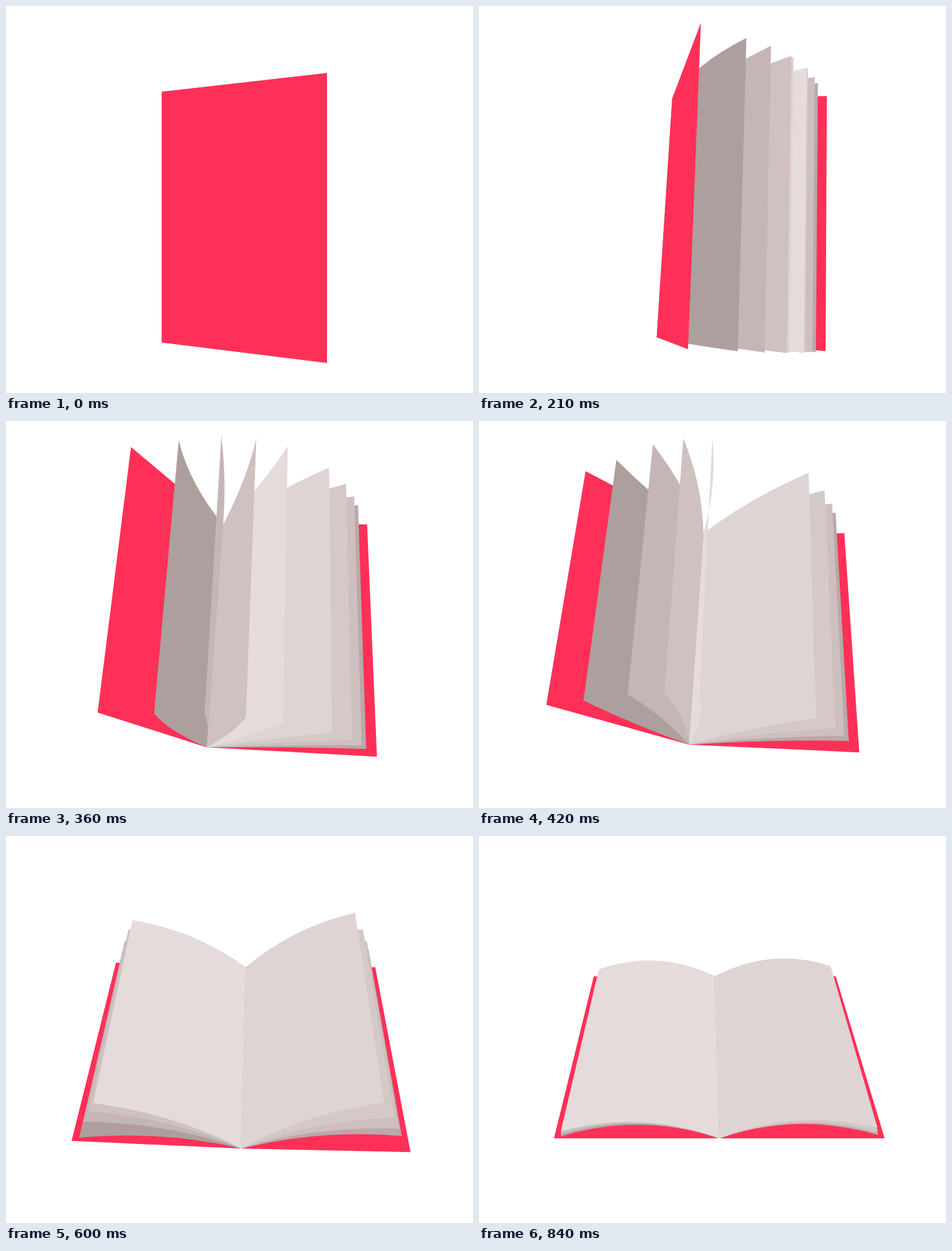
These frames come from a looping animation (822 px wide and 681 px high, 0.93 s). An HTML page:

```html
<!DOCTYPE html>
<html lang="en">
<head>
<meta charset="utf-8">
<title>Opening book</title>
<style>
html, body { margin: 0; width: 100%; height: 100%; overflow: hidden; background: #fff; }
svg { display: block; width: 100vw; height: 100vh; }
</style>
</head>
<body>
<svg id="stage" viewBox="0 0 822 681"></svg>
<script>
const STEP = 30, LOOP = 930, LAST = 28;
const KEYS = [0, 4, 9, 16, 20, LAST];
const RED = '#ff3058';
const LEFT = ['#ad9f9d', '#c5b6b5', '#cfc1c0', '#e5dbda'];
const RIGHT = ['#ded4d3', '#d5c9c8', '#cdbfbe', '#b9a9a8'];
const PAGE = 0.96; // page width relative to the cover

const { sin, cos, PI, max, min } = Math;

// Smooth curve through one value per key, easing out at the end.
function curve(...v) {
  const gap = KEYS.slice(1).map((k, i) => k - KEYS[i]);
  const rise = gap.map((g, i) => (v[i + 1] - v[i]) / g);
  const end = gap.length;
  const slope = v.map((_, i) => i && i < end
    ? (gap[i] * rise[i - 1] + gap[i - 1] * rise[i]) / (gap[i] + gap[i - 1]) : 0);
  slope[0] = 2 * rise[0] - slope[1];
  slope[end] = 0.4 * (2 * rise[end - 1] - slope[end - 1]);
  return n => {
    let i = 0;
    while (i < end - 1 && n >= KEYS[i + 1]) i++;
    const u = (n - KEYS[i]) / gap[i], w = 1 - u;
    return v[i] * w * w * (1 + 2 * u) + v[i + 1] * u * u * (3 - 2 * u)
      + gap[i] * u * w * (w * slope[i] - u * slope[i + 1]);
  };
}

const topX = curve(274, 310, 359, 406, 422, 415);
const topY = curve(151, 162, 165, 211, 231, 247);
const topWidth = curve(291, 285, 263, 242, 228, 213);
const footX = curve(274, 291, 329, 385, 414, 423);
const footY = curve(592, 587, 580, 564, 550, 532);

// A spine end, the vector along the back cover, and the height of the turning arc.
const topEnd = n => ({
  x: topX(n), y: topY(n),
  ux: topWidth(n), uy: -33 * max(0, 1 - n / 8),
  rise: 82 + 145 * sin(PI / 2 * n / LAST) ** 1.25
});
const footEnd = n => ({
  x: footX(n), y: footY(n),
  ux: 291 + 9 * sin(PI * n / LAST), uy: 36 * (1 - n / LAST) ** 1.4,
  rise: 86 - 148 * cos(PI * n / 27)
});

// Offset along direction a (radians) in the plane across the spine.
const arm = (e, a, r) => [
  r * cos(a) * e.ux,
  r * (cos(a) * e.uy - sin(a) * e.rise)
];

// Edge of a leaf: the spine point, the curve's control point, the outer corner.
function edge(e, a, r, bend) {
  const [x, y] = arm(e, a, r);
  const [dx, dy] = arm(e, a + PI / 2, bend);
  return {
    inner: [e.x, e.y],
    mid: [e.x + x / 2 + dx, e.y + y / 2 + dy],
    outer: [e.x + x, e.y + y]
  };
}

function leaf(n, a, r, bend) {
  const foot = edge(footEnd(n), a, r, bend), top = edge(topEnd(n), a, r, bend);
  return `M${foot.inner}Q${foot.mid} ${foot.outer}L${top.outer}Q${top.mid} ${top.inner}Z`;
}

const coverAngle = n => 180 * (1 - max(0, 1 - n / 21) ** 1.45);
const bow = n => 0.19 * max(0, (n - 9) / 19) ** 0.8;

// Turning pages trail the cover, then catch up with it; the first one leads.
function leftPage(n, color, i) {
  const lead = 0.1 ** i;
  const u = min(1, max(0, (n - 9) / 18));
  const lag = (0.25 + 0.147 * i) * (1 - sin(PI / 2 * u)) ** (1 + 0.8 * lead);
  const angle = min(coverAngle(n) * (1 - lag), 180 - 0.8 * (i + 1));
  const curl = 0.13 * lead * max(0, sin(PI * n / 20));
  return { color, angle, bend: curl - bow(n) };
}

// The other pages fan out and sink back.
function rightPage(n, color, i) {
  const fan = sin(PI * (n / 29.5) ** 0.75);
  return { color, angle: 40 * 0.68 ** i * fan, bend: bow(n) };
}

const NS = 'http://www.w3.org/2000/svg';
const stage = document.getElementById('stage');
const paths = Array.from({ length: LEFT.length + RIGHT.length + 2 }, () =>
  stage.appendChild(document.createElementNS(NS, 'path')));

function draw(n) {
  const rad = PI / 180;
  const turn = coverAngle(n);
  const lid = [leaf(n, turn * rad, 1 + 0.07 * sin(turn * rad), 0), RED];
  const pages = [
    ...LEFT.map((c, i) => leftPage(n, c, i)),
    ...RIGHT.map((c, i) => rightPage(n, c, i))
  ].sort((p, q) => p.angle - q.angle);
  const right = pages.filter(p => p.angle <= 90);
  const left = pages.filter(p => p.angle > 90).reverse();
  const shapes = [...right, ...left].map(p =>
    [leaf(n, p.angle * rad, PAGE, p.bend), p.color]);
  shapes.unshift([leaf(n, 0, 1, 0), RED]);
  if (turn > 90) shapes.unshift(lid); else shapes.push(lid);
  shapes.forEach(([d, fill], i) => {
    paths[i].setAttribute('d', d);
    paths[i].setAttribute('fill', fill);
  });
}

const start = performance.now();
function tick() {
  const t = (performance.now() - start) % LOOP;
  draw(min(LAST, Math.floor(t / STEP)));
  requestAnimationFrame(tick);
}
tick();
</script>
</body>
</html>
```
